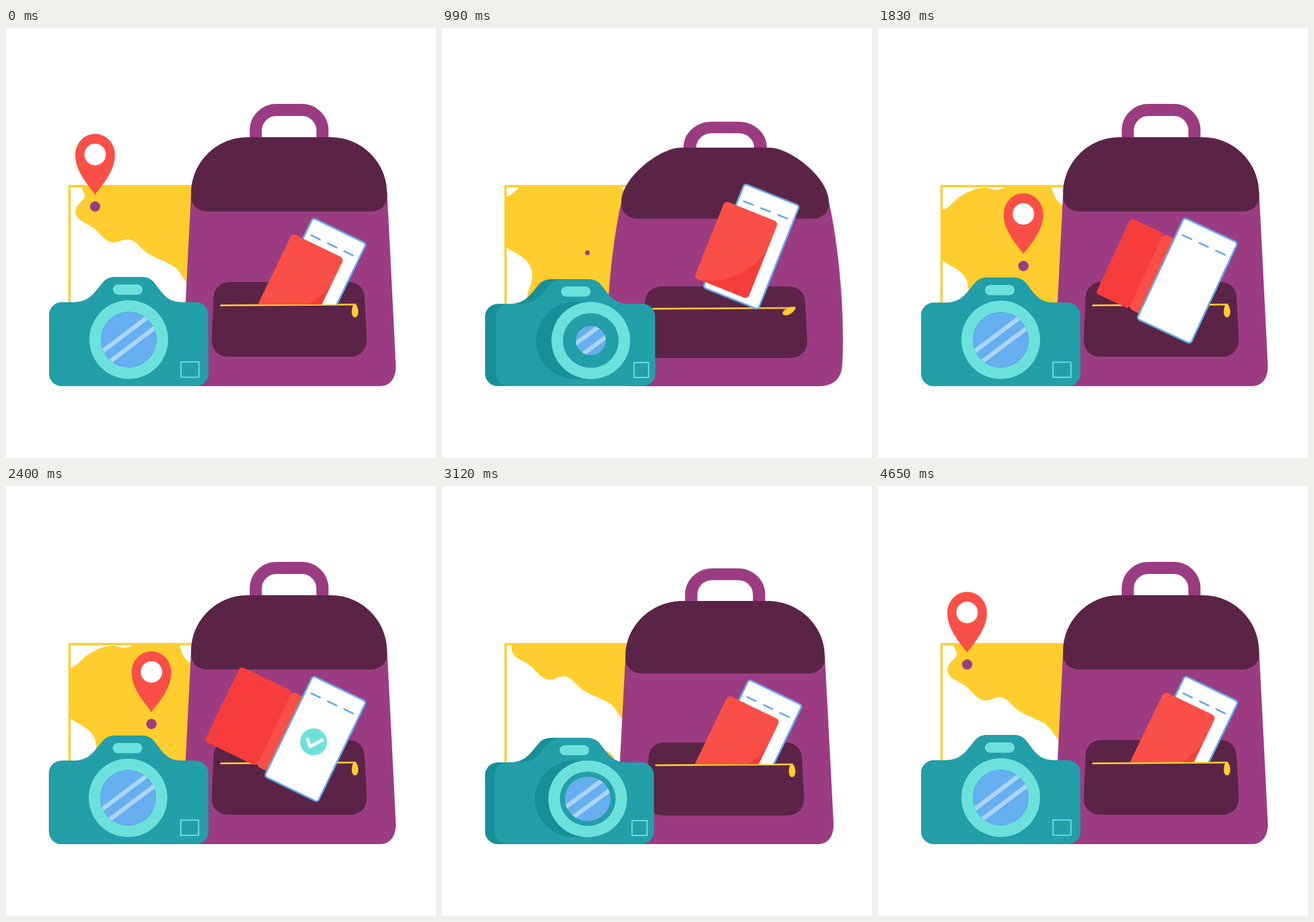
An HTML page without scripts for the animation above (4.68 s loop, 748 by 748 pixels).

```html
<!DOCTYPE html>
<html lang="en">
<head>
<meta charset="utf-8">
<title>Travel kit</title>
<style>
@property --turn { syntax: '<number>'; inherits: true; initial-value: 0; }
html, body { margin: 0; width: 100%; height: 100%; overflow: hidden; background: #fff; }
svg { display: block; width: 100vw; height: 100vh; }
svg * { animation: 4.68s infinite cubic-bezier(.5, 0, .5, 1); }

.purple { fill: #9b3c82; }
.plum { fill: #5b2447; }
.yellow { fill: #ffce2e; }
.red { fill: #fa4f46; }
.crimson { fill: #f63d3b; }
.teal { fill: #229fa9; }
.deep { fill: #168f99; }
.aqua { fill: #6ce1dc; }
.line { fill: none; stroke-linecap: round; stroke-linejoin: round; }

/* map */
.scroll { animation-name: scroll; }
@keyframes scroll {
  0%, 11.5% { transform: translateY(0); }
  20% { transform: translateY(-262px); }
  27%, 61.5% { transform: translateY(-238px); }
  69.5% { transform: translateY(24px); }
  77%, 100% { transform: translateY(0); }
}
.pin { animation-name: pin; }
.dot { animation-name: dot; }
.second * { animation-delay: -2.34s; }
@keyframes pin {
  0%, 3% { transform: scale(1); animation-timing-function: ease-in; }
  10.5%, 72.4% { transform: scale(0); }
  79.5% { transform: scale(1.1); }
  84%, 100% { transform: scale(1); }
}
@keyframes dot {
  0%, 2% { transform: scale(1); }
  8%, 69% { transform: scale(0); }
  73.5%, 100% { transform: scale(1); }
}

/* backpack */
.bag { transform-origin: 492.5px 623px; animation-name: bag; }
@keyframes bag {
  0% { transform: translateY(0) scale(1); }
  2.8% { transform: translateY(0) scale(1.09, .94); animation-timing-function: ease-in; }
  4.5% { transform: translateY(0) scale(1.03, 1); animation-timing-function: cubic-bezier(.36, .64, .67, 1); }
  11.9% { transform: translateY(-71px) scale(1.014, 1.018); animation-timing-function: cubic-bezier(.33, 0, .67, .33); }
  18.6% { transform: translateY(0) scale(1, 1.01); animation-timing-function: ease-out; }
  20.9% { transform: translateY(0) scale(1.058, .958); }
  26.9% { transform: translateY(0) scale(.985, 1.016); }
  30.3%, 63.5% { transform: translateY(0) scale(1); }
  67.3% { transform: translateY(0) scale(1.017, .976); }
  71.4% { transform: translateY(0) scale(.99, 1.012); }
  75%, 100% { transform: translateY(0) scale(1); }
}
.sides { animation-name: bulge; }
@keyframes bulge {
  0%, 11.5%, 18.6%, 26.5%, 100% {
    d: path("M322 288C317 384 312 484 307 585C306 610 317 623 335 623L650 623C668 623 679 610 678 585C673 484 668 384 663 288Z");
  }
  2.8%, 20.9% {
    d: path("M322 288C309 348 294 480 300 585C301 610 316 623 337 623L648 623C669 623 684 610 685 585C691 480 676 348 663 288Z");
  }
}
.lid { animation-name: lid; }
@keyframes lid {
  0%, 11.5%, 18.6%, 26.5%, 100% {
    d: path("M322 288C322 234 366 190 420 190L565 190C619 190 663 234 663 288C665 307 652 319 635 319L350 319C333 319 320 307 322 288Z");
  }
  2.8%, 20.9% {
    d: path("M322 288C322 245 385 190 420 190L565 190C600 190 663 245 663 288C665 307 652 319 635 319L350 319C333 319 320 307 322 288Z");
  }
}
.handle { animation-name: handle; }
@keyframes handle {
  0%, 13%, 18.6%, 26.9%, 100% { transform: translateY(0); }
  2.8%, 20.9% { transform: translateY(11px); }
  9% { transform: translateY(4px); }
}
.tab { transform-origin: 607px 481px; animation-name: tab; }
@keyframes tab {
  0%, 30.3%, 100% { transform: rotate(0); }
  2.8% { transform: rotate(10deg); }
  9% { transform: rotate(-20deg); }
  15% { transform: rotate(-10deg); }
  21% { transform: rotate(60deg); }
  25% { transform: rotate(-25deg); }
  28% { transform: rotate(8deg); }
}

/* passport and ticket */
.opening { animation-name: bag, release; }
@keyframes release {
  0%, 61% { height: 580px; animation-timing-function: step-end; }
  17.5% { height: 900px; animation-timing-function: step-end; }
}
.papers { transform-origin: 538px 440px; animation-name: papers; }
@keyframes papers {
  0% { transform: translateY(0) rotate(0); }
  2.8% { transform: translateY(17px) rotate(0); animation-timing-function: ease-in; }
  4.5% { transform: translateY(0) rotate(0); animation-timing-function: cubic-bezier(.36, .64, .67, 1); }
  11.9% { transform: translateY(-76px) rotate(0); animation-timing-function: ease-out; }
  16.7% { transform: translateY(-88px) rotate(0); animation-timing-function: ease-in; }
  21.15% { transform: translateY(-60px) rotate(-4deg); animation-timing-function: ease-out; }
  30.8% { transform: translateY(-7px) rotate(-14.3deg); }
  41%, 56.4% { transform: translateY(0) rotate(0); }
  61% { transform: translateY(-85px) rotate(0); animation-timing-function: ease-in; }
  64.5% { transform: translateY(0) rotate(0); }
  67.3% { transform: translateY(7px) rotate(0); }
  71.4% { transform: translateY(-3px) rotate(0); }
  75%, 100% { transform: translateY(0) rotate(0); }
}
.cover { animation-name: flip; }
@keyframes flip {
  0%, 33%, 58.5%, 100% { transform: scaleX(1); }
  42%, 52.5% { transform: scaleX(-1); }
}
.inside { animation-name: inside; animation-timing-function: step-end; }
@keyframes inside {
  0%, 55.5% { opacity: 0; }
  37.5% { opacity: 1; }
}
.check { animation-name: check; }
@keyframes check {
  0%, 41% { transform: scale(0); }
  46% { transform: scale(1.15); }
  49%, 62% { transform: scale(1); }
  63%, 100% { transform: scale(0); }
}

/* camera: --turn is the sideways travel of the lens in px */
.camera { transform-origin: 213px 623px; animation: turn 2.34s infinite cubic-bezier(.5, 0, .5, 1), settle 4.68s infinite ease-in-out; }
@keyframes turn {
  0%, 59%, 100% { --turn: 0; }
  21.4% { --turn: -52; }
  37.2% { --turn: 50; }
}
@keyframes settle {
  0%, 9%, 59%, 94%, 100% { transform: scaleY(1); }
  16.7%, 66.7% { transform: scaleY(.974); }
  21.2%, 71.2% { transform: scaleY(.98); }
  30.8%, 51.3%, 80.8% { transform: scaleY(.995); }
}
.rear { transform: translateX(calc(max(0, 0 - var(--turn)) * .1px)); }
.front { transform: translateX(calc(var(--turn) * .415px)); }
.flash { transform: translateX(calc(max(0, var(--turn)) * .05px)); }
.barrel {
  x: calc(145px + min(var(--turn), var(--turn) * .415) * 1px);
  width: calc(137px + max(var(--turn), 0 - var(--turn)) * .585px);
}
.lens { transform: translateX(calc(var(--turn) * 1px)); }
.label {
  transform-origin: 320px 594px;
  transform: translateX(calc((var(--turn) * .42 + max(0, var(--turn)) * .17) * 1px))
    scaleX(calc(1 - var(--turn) * .002 - max(0, var(--turn)) * .002));
  vector-effect: non-scaling-stroke;
}
.iris { transform-origin: 213.5px 542px; animation-name: iris; animation-duration: 2.34s; }
@keyframes iris {
  0%, 27.35%, 55.5%, 100% { transform: scale(1); }
  41% { transform: scale(.53); }
}
</style>
</head>
<body>
<svg viewBox="0 0 748 748">
  <defs>
    <clipPath id="sheet"><rect x="109" y="273" width="282" height="349" rx="2"/></clipPath>
    <clipPath id="pocket"><rect class="opening bag" x="-100" y="-100" width="948" height="580"/></clipPath>
    <clipPath id="glass"><circle class="iris" cx="213.5" cy="542" r="48.5"/></clipPath>
    <path id="shell" d="M97 477H120C148 476 157 455 170 441C176 435 183 433 191 433H235C243 433 250 435 256 441C269 456 277 476 303 477H330A22 22 0 0 1 352 499V601A22 22 0 0 1 330 623H97A22 22 0 0 1 75 601V499A22 22 0 0 1 97 477Z"/>
    <g id="marker">
      <path class="red" d="M0 -20.5C-6 -31 -34.5 -58 -34.5 -90A34.5 36.5 0 0 1 34.5 -90C34.5 -58 6 -31 0 -20.5Z"/>
      <circle cy="-90.5" r="18.7" fill="#fff"/>
    </g>
  </defs>

  <g clip-path="url(#sheet)">
    <g class="scroll yellow">
      <path d="M126 230L132 277C133 286 140 290 136 296C131 304 121 308 121 320C122 336 141 338 155 350C166 360 174 374 190 373C200 372 208 364 219 369C230 374 234 385 250 394C268 404 285 408 296 418C303 425 306 433 313 441C335 465 360 470 400 478V230Z"/>
      <path transform="translate(0 238)" d="M105 316C126 317 126 303 145 292C164 280 182 275 197 280C210 284 220 279 232 270C250 256 284 250 296 266C306 282 304 298 322 309C340 316 370 316 400 318V700H105V560C140 560 145 510 149 484C153 472 157 466 157 452C155 422 130 418 105 400Z"/>
    </g>
  </g>
  <rect class="line" x="110.5" y="275" width="278.5" height="345" stroke="#ffce2e" stroke-width="4"/>
  <g class="scroll">
    <g transform="translate(155 310.5)">
      <circle class="dot purple" r="9"/>
      <g class="pin"><use href="#marker"/></g>
    </g>
    <g class="second" transform="translate(253 652)">
      <circle class="dot purple" r="9"/>
      <g class="pin"><use href="#marker"/></g>
    </g>
  </g>

  <g class="bag">
    <path class="handle line" d="M434.5 225V178.5A36 36 0 0 1 470.5 142.5H514.5A36 36 0 0 1 550.5 178.5V225" stroke="#9b3c82" stroke-width="21"/>
    <path class="sides purple" d="M322 288C317 384 312 484 307 585C306 610 317 623 335 623L650 623C668 623 679 610 678 585C673 484 668 384 663 288Z"/>
    <path class="lid plum" d="M322 288C322 234 366 190 420 190L565 190C619 190 663 234 663 288C665 307 652 319 635 319L350 319C333 319 320 307 322 288Z"/>
    <path class="plum" d="M389 442H596C612 442 623 452 624 470L627.5 542C628 560 615 572 598 572H387C370 572 357 560 358 542L361 470C362 452 373 442 389 442Z"/>
    <path class="line" d="M374 482.5L607 481" stroke="#ffce2e" stroke-width="3"/>
    <path class="tab yellow" d="M605 480C600 488 600 503 607 503.5C614 503 615 488 608 480Z"/>
  </g>

  <g clip-path="url(#pocket)">
    <g class="papers">
      <g transform="translate(538 440) rotate(25.8)">
        <rect class="red" x="-72" y="-57" width="100" height="144" rx="7"/>
        <rect x="-51.5" y="-97" width="103" height="194" rx="5" fill="#fff" stroke="#62aaec" stroke-width="3"/>
        <path class="line" d="M-41 -68.5h17M-9 -68.5h17M23 -68.5h17" stroke="#62aaec" stroke-width="3"/>
        <g transform="translate(-.5 5.8)">
          <g class="check">
            <circle class="aqua" r="23.5"/>
            <path class="line" d="M-11 1L-2 10L12 -9" stroke="#fff" stroke-width="6"/>
          </g>
        </g>
        <g transform="translate(-72 -57)">
          <g class="cover">
            <rect class="red" width="100" height="144" rx="7"/>
            <path class="crimson" d="M7 144C52 136 88 104 100 50V137A7 7 0 0 1 93 144Z"/>
            <rect class="inside crimson" width="100" height="144" rx="7"/>
          </g>
        </g>
      </g>
    </g>
  </g>

  <g class="camera">
    <use class="rear deep" href="#shell"/>
    <g class="front">
      <use class="teal" href="#shell"/>
      <rect class="flash aqua" x="186" y="446" width="51.5" height="18" rx="9"/>
    </g>
    <rect class="label line" x="304.5" y="581" width="31" height="26.5" stroke="#6ce1dc" stroke-width="2.2"/>
    <rect class="barrel deep" x="145" y="473.5" width="137" height="137" rx="68.5"/>
    <g class="lens">
      <circle class="aqua" cx="213.5" cy="542" r="68.5"/>
      <circle class="teal" cx="213.5" cy="542" r="48.5"/>
      <g clip-path="url(#glass)">
        <circle cx="213.5" cy="542" r="48.5" fill="#65aeef"/>
        <path d="M155 572L265 489M168 590L278 507" stroke="#abd5f9" stroke-width="7.5"/>
      </g>
    </g>
  </g>
</svg>
</body>
</html>
```
